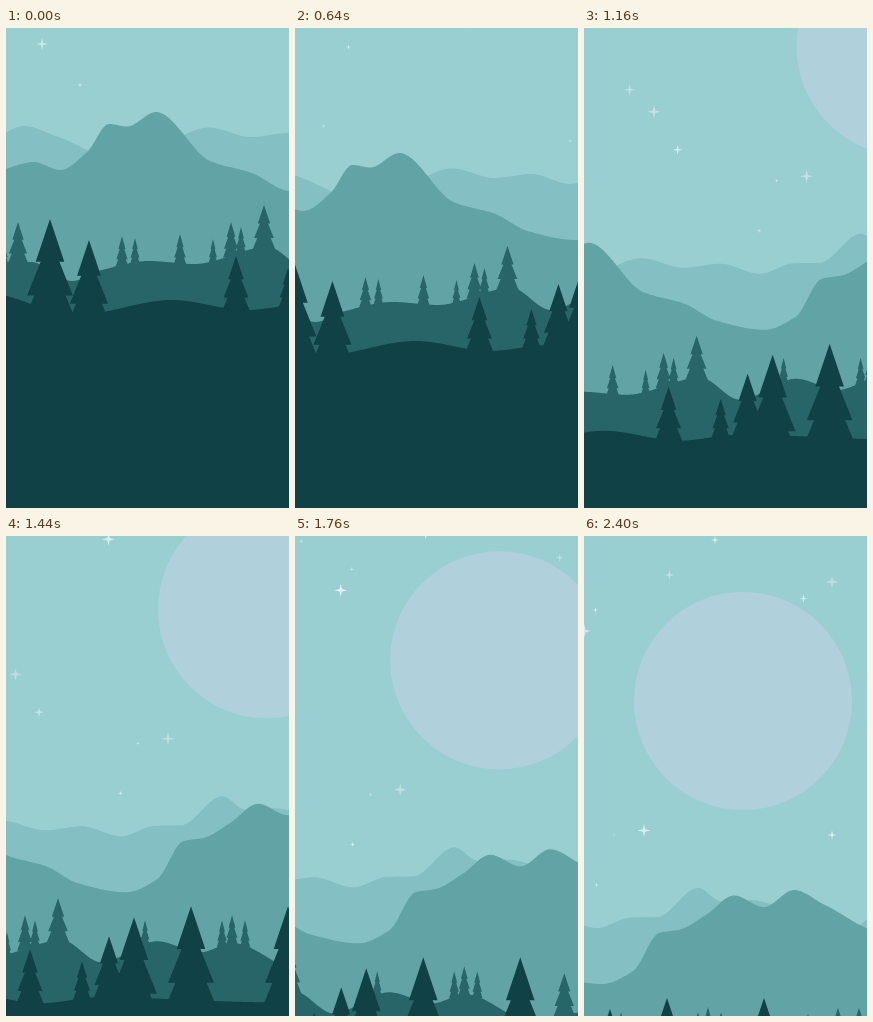
These frames come from a looping animation (283 px wide and 480 px high, 2440 ms). An HTML page with a canvas:

```html
<!DOCTYPE html>
<html lang="en">
<head>
<meta charset="utf-8">
<title>Mountain pan</title>
<style>
  html, body { margin: 0; height: 100%; overflow: hidden; background: #9acfd2; }
  canvas { display: block; }
</style>
</head>
<body>
<canvas id="stage" width="283" height="480"></canvas>
<script>
const W = 283, H = 480, LOOP = 2440, PAN = 2400, MOONRISE = 1060;
const PAN_X = -308, PAN_Y = 277, LEFT = -20, RIGHT = 610, BOTTOM = 600;
const ctx = document.getElementById('stage').getContext('2d');

// Height of a ridge at x: a monotone cubic curve through its crests, dips and shoulders
function ridge(...pts) {
  const slope = i => (pts[i + 1][1] - pts[i][1]) / (pts[i + 1][0] - pts[i][0]);
  const tangents = pts.map((_, i) => {
    if (i === 0 || i === pts.length - 1) return 0;
    const a = slope(i - 1), b = slope(i);
    return a * b > 0 ? 2 * a * b / (a + b) : 0;
  });
  return x => {
    const i = Math.max(0, pts.findLastIndex((p, k) => k < pts.length - 1 && p[0] <= x));
    const [x0, y0] = pts[i], [x1, y1] = pts[i + 1];
    const w = x1 - x0, u = (x - x0) / w, v = 1 - u;
    return y0 * v * v * (1 + 2 * u) + y1 * u * u * (3 - 2 * u)
      + w * u * v * (tangents[i] * v - tangents[i + 1] * u);
  };
}

function addTree(path, x, y, h) {
  const w = h * Math.min(.255, .1 + .0035 * h);
  const side = [[.55, .42], [.36, .42], [.88, .75], [.6, .75], [1, 1]];
  path.moveTo(x, y);
  for (const [u, v] of side) path.lineTo(x + u * w, y + v * h);
  for (const [u, v] of side.reverse()) path.lineTo(x - u * w, y + v * h);
  path.closePath();
}

// Trees are [x, tip, height]; without a height they reach just into the ground
function layer(color, heightAt, trees = []) {
  const ground = new Path2D(), wood = new Path2D();
  ground.moveTo(LEFT, BOTTOM);
  for (let x = LEFT; x <= RIGHT; x++) ground.lineTo(x, heightAt(x));
  ground.lineTo(RIGHT, BOTTOM);
  for (const [x, tip, h = heightAt(x) + 2 - tip] of trees) addTree(wood, x, tip, h);
  return { color, ground, wood };
}

const layers = [
  layer('#84c0c3', ridge([-20, 112], [18, 98], [50, 108], [120, 134], [203, 99.5], [245, 109],
    [282, 105], [321, 115], [355, 104.5], [381, 104], [422, 75], [446, 88.5], [473, 87],
    [570, 119], [610, 95])),
  layer('#62a4a6', ridge([-20, 145], [28, 134], [54, 142], [81, 124], [103, 96], [121, 98.5],
    [150, 84], [204, 133], [246, 145], [278, 162], [326, 171], [357, 158], [383, 120],
    [404, 116.5], [431, 101], [458, 82.5], [488, 94], [518, 77], [549, 92], [610, 120])),
  layer('#286568', ridge([-20, 234], [25, 234], [66, 253], [96, 242], [143, 233], [188, 236],
    [262, 219], [301, 241], [357, 220], [400, 231], [433, 222], [500, 249], [540, 241], [610, 235]),
    [[-3, 209], [12, 194], [116, 208], [129, 210], [174, 206], [207, 211], [225, 194], [235, 199],
      [258, 177], [345, 199], [422, 199], [432, 194], [445, 199], [532, 201], [562, 195], [583, 195]]),
  layer('#0f4146', ridge([-20, 265], [70, 287], [166, 272], [240, 282], [300, 276], [470, 281],
    [610, 277]),
    [[44, 191, 102], [83, 212, 85], [230, 228], [282, 240], [309, 215, 65], [334, 196, 102],
      [391, 185, 102], [488, 185, 102]]),
];

// Stars are [x, y, radius]; the night stars come out with the moon
const duskStars = [[36, 16, 6], [74, 57, 2.5], [99, -22, 3], [215.5, -47, 6.5], [320.5, 72, 2.5]];
const nightStars = [[239, -9, 5], [191, -69, 6], [338, 22, 2], [368, 17.5, 6.5], [308.5, -182, 6.5],
  [269, -231, 2.5], [319.5, -203, 2.5], [393.5, -238, 5], [527.5, -214.5, 4.5], [439, -273, 4],
  [556, -231, 6.5], [556, 22, 4.5]];

function drawStar([x, y, r], i, t) {
  ctx.fillStyle = `rgba(255, 255, 255, ${.52 + .2 * Math.sin(i * 2.4 + t / 400)})`;
  ctx.beginPath();
  for (let k = 0; k < 8; k++) {
    const d = k % 2 ? r * .26 : r, a = k * Math.PI / 4;
    ctx.lineTo(x + d * Math.cos(a), y + d * Math.sin(a));
  }
  ctx.fill();
}

// cubic-bezier(.42, 0, .58, 1)
function easeInOut(x) {
  let lo = 0, hi = 1;
  for (let i = 0; i < 24; i++) {
    const s = (lo + hi) / 2, r = 1 - s;
    if (1.26 * s * r * r + 1.74 * s * s * r + s * s * s < x) lo = s; else hi = s;
  }
  return lo * lo * (3 - 2 * lo);
}

function draw(now) {
  const t = now % LOOP, p = easeInOut(Math.min(t / PAN, 1));
  ctx.fillStyle = '#9acfd2';
  ctx.fillRect(0, 0, W, H);
  ctx.save();
  ctx.translate(PAN_X * p, PAN_Y * p);

  duskStars.forEach((star, i) => drawStar(star, i, t));
  if (t >= MOONRISE) {
    nightStars.forEach((star, i) => drawStar(star, i, t));
    ctx.fillStyle = '#b0d1dc';
    ctx.beginPath();
    ctx.arc(467, -112, 109, 0, Math.PI * 2);
    ctx.fill();
  }
  for (const { color, ground, wood } of layers) {
    ctx.fillStyle = color;
    ctx.fill(ground);
    ctx.fill(wood);
  }
  ctx.restore();
  requestAnimationFrame(draw);
}
requestAnimationFrame(draw);
</script>
</body>
</html>
```
